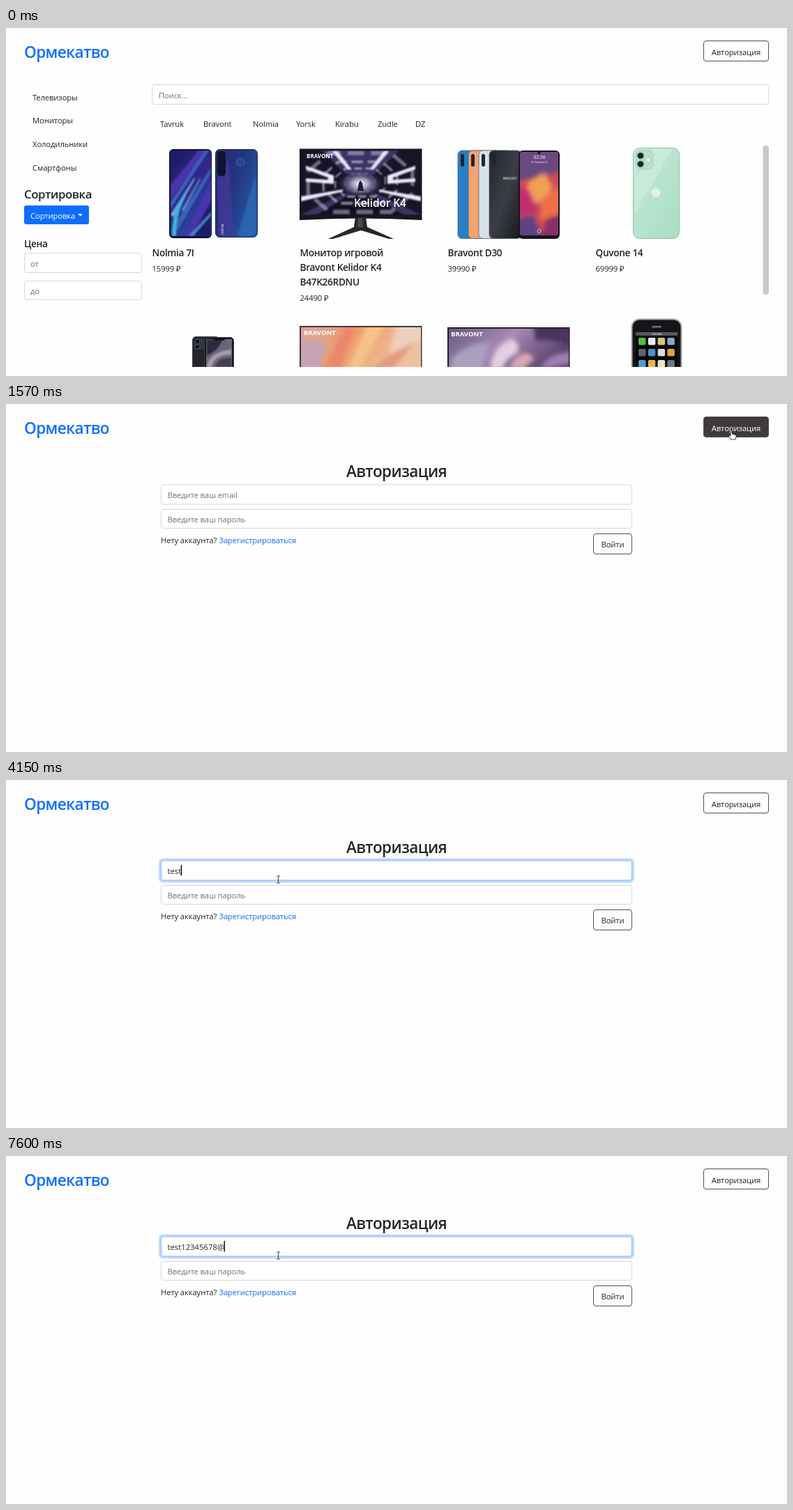
Recreate the animation shown at these times as an HTML page. Size 1120 px wide and 500 px high, loop 8000 ms.

```html
<!DOCTYPE html>
<html lang="ru">
<head>
<meta charset="utf-8">
<title>Магазин</title>
<style>
html, body { margin: 0; width: 100%; height: 100%; overflow: hidden; background: #fefefe; }
svg { display: block; }
text { font: 11.3px "Open Sans", "Noto Sans", sans-serif; letter-spacing: -.14px; fill: #212529; white-space: pre; }
#typed { letter-spacing: 0; }
.h2, .h4, .h5 { font-weight: 600; letter-spacing: -.025em; }
.h2 { font-size: 22.5px; }
.h4 { font-size: 16.8px; }
.h5 { font-size: 13.7px; }
.mark { font-weight: 700; font-size: 9.5px; letter-spacing: 0; }
.blue { fill: #0d6efd; }
.hint { fill: #6c757d; }
.white { fill: #fff; }
.mid { text-anchor: middle; }
.field { fill: #fff; stroke: #d3d8dd; }
.button { fill: #fefefe; stroke: #4d5154; }
.soft { filter: url(#soft); }
.softer { filter: url(#softer); }
</style>
</head>
<body>
<svg width="1120" height="500" viewBox="0 0 1120 500">
  <defs>
    <linearGradient id="night" x2=".6" y2="1"><stop stop-color="#1a1b57"/><stop offset=".5" stop-color="#31268a"/><stop offset="1" stop-color="#23509f"/></linearGradient>
    <linearGradient id="shell" x2="1" y2=".6"><stop stop-color="#2c2674"/><stop offset=".5" stop-color="#23357f"/><stop offset="1" stop-color="#2557a4"/></linearGradient>
    <linearGradient id="mint" x2="1" y2="1"><stop stop-color="#c3ebd7"/><stop offset="1" stop-color="#aadcc4"/></linearGradient>
    <linearGradient id="black" x2="1" y2="1"><stop stop-color="#23252c"/><stop offset=".5" stop-color="#3c3e46"/><stop offset="1" stop-color="#17181d"/></linearGradient>
    <linearGradient id="sunset" x2="1" y2=".3"><stop stop-color="#dba7a6"/><stop offset=".45" stop-color="#ee9c68"/><stop offset="1" stop-color="#efc0a0"/></linearGradient>
    <linearGradient id="violet" x2="1" y2=".4"><stop stop-color="#665a7c"/><stop offset=".5" stop-color="#a78ab8"/><stop offset="1" stop-color="#5d456f"/></linearGradient>
    <radialGradient id="glow"><stop stop-color="#fff"/><stop offset=".35" stop-color="#c9c5e6" stop-opacity=".8"/><stop offset="1" stop-color="#4c4380" stop-opacity="0"/></radialGradient>
    <filter id="soft"><feGaussianBlur stdDeviation=".8"/></filter>
    <filter id="softer"><feGaussianBlur stdDeviation="3"/></filter>
    <clipPath id="list"><path d="M200 160H1080V487H200z"/></clipPath>
    <clipPath id="screenA"><rect x="236" y="176" width="58" height="123" rx="4"/></clipPath>
    <clipPath id="screenB"><path d="M423 176H595V269H423z"/></clipPath>
    <clipPath id="screenC"><rect x="737" y="178" width="55" height="120" rx="4"/></clipPath>
    <clipPath id="screenE"><path d="M423 430H595V487H423z"/></clipPath>
    <clipPath id="screenF"><path d="M635 432H807V487H635z"/></clipPath>
  </defs>

  <text class="h2 blue" x="26" y="43">Ормекатво</text>
  <rect id="auth" x="1000.5" y="18.5" width="93" height="29" rx="3.5" stroke="#4d5154"/>
  <text id="authText" class="mid" x="1047" y="39">Авторизация</text>

  <g id="shop">
    <text x="38" y="103.5">Телевизоры</text>
    <text x="38" y="137">Мониторы</text>
    <text x="38" y="171">Холодильники</text>
    <text x="38" y="204.5">Смартфоны</text>
    <text class="h4" x="26" y="245">Сортировка</text>
    <rect class="blue" x="26" y="255" width="93" height="27" rx="3"/>
    <text class="white" x="35" y="273.5">Сортировка</text>
    <path class="white" d="M103 267h7l-3.5 3.5z"/>
    <text class="h5" x="26" y="314.5">Цена</text>
    <rect class="field" x="26.5" y="323.5" width="168" height="28" rx="3"/>
    <text class="hint" x="35" y="342.5">от</text>
    <rect class="field" x="26.5" y="363.5" width="168" height="27" rx="3"/>
    <text class="hint" x="35" y="382">до</text>
    <rect class="field" x="209.5" y="81.5" width="884" height="28" rx="3"/>
    <text class="hint" x="219" y="101">Поиск...</text>
    <g id="brands"></g>
    <rect x="1085.5" y="169" width="8.5" height="214" rx="4" fill="#c9c9c9"/>

    <g id="phoneA">
      <rect x="234" y="174" width="61" height="128" rx="6" fill="#11143a"/>
      <g clip-path="url(#screenA)">
        <path fill="url(#night)" d="M236 176h58v123h-58z"/>
        <g class="soft">
          <path fill="#4a35ab" d="M236 226l40-50h12l-52 70zM256 299l38-80v40l-20 40z"/>
          <path fill="#3a62bd" d="M236 250l50-74h5l-55 84zM240 285l54-84v7l-48 83z"/>
          <path fill="#6fa9e0" d="M236 268l34-53 1 2-31 55zM252 262l26-46 1 1-25 46z"/>
          <path fill="#3fb5dc" d="M238 299q0-36 17-60l3 2q-15 28-14 58z"/>
          <path fill="#1f1f68" d="M266 299l28-50v50zM236 176h24l-24 30z"/>
          <path fill="#4487cb" d="M262 299l32-34v4l-26 30z"/>
        </g>
      </g>
      <rect x="300.5" y="174.5" width="60" height="126" rx="6" fill="url(#shell)" stroke="#1b2452"/>
      <path class="soft" fill="#4d3aa0" opacity=".6" d="M303 216l16-28 8 110h-22z"/>
      <path class="soft" fill="#2d78c4" opacity=".5" d="M332 299l26-90v82l-4 7z"/>
      <rect x="303" y="177" width="12" height="36" rx="5" fill="#10132f"/>
      <circle cx="336" cy="193" r="6" fill="#24479a" stroke="#3f66b4"/>
      <text class="white" style="font-size:5px" transform="translate(312 297) rotate(-90)">nolmia</text>
    </g>

    <g id="monitor">
      <path fill="#18171c" d="M421 173.5h175.5V276q-88-5-175.5 0z"/>
      <g clip-path="url(#screenB)">
        <path fill="#171427" d="M423 176h172v93H423z"/>
        <g class="soft">
          <path fill="#3b3566" d="M452 176h112l-36 34h-40zM423 268l62-30h46l64 30z"/>
          <path fill="#131120" d="M446 268l50-31h24l50 31z"/>
          <g id="tunnel" fill="none" stroke="#dcd9f2"></g>
          <path fill="#eceafa" d="M430 198l40 14v12l-40-3v-5l32 2v-3l-32-12zM587 198l-40 14v12l40-3v-5l-32 2v-3l32-12z"/>
          <path fill="#eceafa" d="M468 177h7l20 26h-5zM549 177h-7l-20 26h5zM423 242l60-10v3l-60 14zM595 242l-60-10v3l60 14z"/>
        </g>
        <ellipse cx="508" cy="224" rx="32" ry="20" fill="url(#glow)"/>
        <path fill="#211c36" d="M504 234l2-11 2-4 3 4 2 11z"/>
      </g>
      <text class="mark white" style="font-size:8px" x="431" y="187">BRAVONT</text>
      <text class="white" style="font-size:15.5px;font-weight:600" x="499" y="257">Kelidor K4</text>
      <path fill="#27262b" d="M501 272h15l2 14 38 17h-7l-39-12h-2l-39 12h-7l37-17z"/>
      <path fill="#4b4a50" d="M505 273h6l1 13h-8z"/>
    </g>

    <g id="phonesC">
      <rect x="735" y="176" width="59" height="127" rx="6" fill="#15171c"/>
      <g clip-path="url(#screenC)">
        <path fill="#cf4a58" d="M737 178h55v120h-55z"/>
        <g class="softer">
          <path fill="#6a4a80" d="M730 170h70v34l-32 10-38 6z"/>
          <path fill="#f0a055" d="M748 222l24-14 12 20-12 22-24 2z"/>
          <path fill="#c22f70" d="M730 226l20 6 14 32-34 8z"/>
          <path fill="#ee6f49" d="M768 246l28-20v40l-30 10z"/>
          <path fill="#5c4382" d="M730 276l26-8 14 36h-40z"/>
          <path fill="#8b2f63" d="M766 304l10-30 24-8v38z"/>
        </g>
      </g>
      <circle cx="764.5" cy="179" r="2" fill="#111"/>
      <text class="white mid" style="font-size:7px" x="765" y="188">02:36</text>
      <text class="white mid" style="font-size:3.5px" x="765" y="194">Fri, February 22</text>
      <circle cx="764.5" cy="292" r="2.5" fill="none" stroke="#fff" stroke-width=".6"/>
    </g>
    <text class="white" style="font-size:4.5px" x="713" y="218">BRAVONT</text>

    <g id="phoneD">
      <rect x="899.5" y="172.5" width="66" height="130" rx="9" fill="url(#mint)" stroke="#8fbfa6"/>
      <path fill="#d8f3e5" opacity=".4" d="M929 173h28l-55 92v-45z"/>
      <rect x="903" y="176" width="25" height="27" rx="7" fill="#b7dfca" stroke="#a5d2bb"/>
      <g fill="#1c2326" stroke="#6f8f80"><circle cx="910" cy="183.5" r="4.5"/><circle cx="910" cy="195.5" r="4.5"/></g>
      <circle cx="921" cy="189.5" r="2" fill="#fffbe9"/>
      <circle cx="932" cy="236.5" r="6.5" fill="#e9eeec"/>
    </g>

    <g id="titles"></g>

    <g clip-path="url(#list)">
      <rect x="267.5" y="443.5" width="38" height="70" rx="5" fill="#23252b" stroke="#464950"/>
      <rect x="270" y="446" width="15" height="16" rx="4" fill="#34373e"/>
      <g fill="#090a0d" stroke="#686c74" stroke-width=".7"><circle cx="274.5" cy="450.5" r="3"/><circle cx="274.5" cy="458" r="3"/></g>
      <rect x="284.5" y="444.5" width="42" height="70" rx="5" fill="#14161c" stroke="#3d4047"/>
      <path fill="#6d6479" d="M287 447h37v41h-37z"/>
      <g class="soft">
        <path fill="#2b2b37" d="M288 448h22q-4 14-22 23z"/>
        <path fill="#a59cb0" d="M288 487q3-22 35-25v7q-25 1-28 18z"/>
        <path fill="#423c50" d="M300 487q3-13 23-13v13z"/>
      </g>
      <rect x="297" y="445" width="17" height="4" rx="2" fill="#14161c"/>

      <path fill="#40383c" d="M421 428h175.5v70H421z"/>
      <g clip-path="url(#screenE)">
        <path fill="url(#sunset)" d="M423 430h172v60H423z"/>
        <g class="softer">
          <path fill="#c3a3b4" d="M415 448l46 4-14 45h-32z"/>
          <path fill="#e9866f" d="M455 495l32-70h16l-26 70z"/>
          <path fill="#f5c287" d="M488 495l30-70h26l-40 70z"/>
          <path fill="#e39a80" d="M520 495l56-50 10 6-36 44z"/>
          <path fill="#ecd0bd" d="M560 425h40v20l-50 24z"/>
        </g>
      </g>
      <text class="mark white" x="427" y="441">BRAVONT</text>

      <path fill="#252129" d="M633 430h175.5v70H633z"/>
      <g clip-path="url(#screenF)">
        <path fill="url(#violet)" d="M635 432h172v60H635z"/>
        <g class="softer">
          <path fill="#a9a0bd" d="M640 474q24-22 54-22l-14 40h-42z"/>
          <path fill="#e2cfe0" d="M694 490q4-34 32-44 14 10 6 22-16 6-20 22z"/>
          <path fill="#dca6b4" d="M722 490q5-19 24-24l12 8-16 16z"/>
          <path fill="#49365f" d="M756 425h56v34q-27-14-52-9z"/>
          <path fill="#9d7fb2" d="M766 490q10-24 44-24v16z"/>
        </g>
      </g>
      <text class="mark white" x="638" y="443">BRAVONT</text>

      <rect x="897.5" y="418.5" width="71" height="100" rx="11" fill="#151517" stroke="#a5a5a8" stroke-width="2"/>
      <rect x="926" y="428" width="14" height="2.5" rx="1.2" fill="#707074"/>
      <path fill="#050506" d="M903 437h60v51h-60z"/>
      <path fill="#55585c" d="M903 437h60v5h-60z"/>
      <text class="white mid" style="font-size:4px" x="933" y="441.2">9:42 AM</text>
      <g id="icons"></g>
    </g>
  </g>

  <g id="login">
    <text class="h2 mid" x="560" y="105">Авторизация</text>
    <rect id="ring" x="219" y="112.5" width="682" height="35" rx="6" fill="#bfdaff"/>
    <rect id="email" class="field" x="222.5" y="116" width="675" height="28" rx="3"/>
    <text id="hint" class="hint" x="231.5" y="134.5">Введите ваш email</text>
    <text id="typed" x="231.5" y="134.5"></text>
    <rect id="caret" y="122" width="1.4" height="15.5"/>
    <rect class="field" x="222.5" y="151.5" width="675" height="27" rx="3"/>
    <text class="hint" x="231.5" y="169.5">Введите ваш пароль</text>
    <text x="222" y="199.5">Нету аккаунта?</text>
    <text class="blue" x="305.5" y="199.5">Зарегистрироваться</text>
    <rect class="button" x="842.5" y="186.5" width="55" height="29" rx="3.5"/>
    <text class="mid" x="870" y="206">Войти</text>
  </g>

  <circle id="click" r="8.5" fill="#d2cb00" opacity=".75"/>
  <g id="cursor" stroke-linejoin="round">
    <path id="arrow" d="M0 0v12l2.8-2.6 1.9 4.2 1.9-.8-1.900-4.100H8.400z" fill="#fff" stroke="#111" stroke-width=".8"/>
    <path id="hand" d="M-1 0q1-1 2 0v5l5 1.300q1.500.6 1.200 2.200L6 13H0L-3.500 8.500q-.5-1.700 1-1.500L-1 8z" fill="#fff" stroke="#111" stroke-width=".8"/>
    <path id="beam" d="M-2.500-5h2l.5.500.5-.500h2M0-4.500v9M-2.500 5h2l.5-.500.5.500h2" fill="none" stroke="#222" stroke-width=".9"/>
  </g>
</svg>
<script>
const $ = id => document.getElementById(id);
const add = (id, markup) => $(id).insertAdjacentHTML('beforeend', markup);
const label = (x, y, text, cls = '') => `<text class="${cls}" x="${x}" y="${y}">${text}</text>`;

const brands = { Tavruk: 221, Bravont: 283, Nolmia: 354, Yorsk: 416, Kirabu: 472, Zudle: 533, DZ: 587 };
for (const name in brands) add('brands', label(brands[name], 142, name));

const goods = [
  ['15999', 'Nolmia 7I'],
  ['24490', 'Монитор игровой', 'Bravont Kelidor K4', 'B47K26RDNU'],
  ['39990', 'Bravont D30'],
  ['69999', 'Quvone 14'],
];
goods.forEach(([price, ...lines], i) => {
  const x = 209.5 + 212 * i;
  lines.forEach((line, j) => add('titles', label(x, 328 + 20.8 * j, line, 'h5')));
  add('titles', label(x, 329.5 + 20.8 * lines.length, price + ' ₽'));
});

[.25, .42, .62, .88].forEach((s, i) => add('tunnel',
  `<path transform="translate(508 222) scale(${s})" stroke-width="${3 + i}" stroke-dasharray="26 12" opacity="${.9 - i * .15}"
    d="M-85-18L-50-48H50L85-18V18L50 48H-50L-85 18z"/>`));

['#277fc6', '#f2a273', '#d5e0e8', 'url(#black)'].forEach((color, i) => {
  const x = 648 + 15 * i;
  $('phonesC').insertAdjacentHTML('beforebegin',
    `<rect x="${x}" y="176" width="46" height="126.5" rx="6" fill="${color}" stroke="#555b66" stroke-width=".7"/>
     <rect x="${x + 4}" y="181" width="5" height="18" rx="2.5" fill="#20242c"/>`);
});

const iconColors = ['#58b947', '#e8ecef', '#d9c178', '#87a9c8', '#5b6470', '#4a91cc', '#d7dde0', '#dfa33f',
  '#4e9ad6', '#e7b84c', '#eee5c4', '#6f7780'];
iconColors.forEach((color, i) => add('icons',
  `<rect x="${907 + i % 4 * 13.8}" y="${445 + (i >> 2) * 16}" width="10.5" height="10.5" rx="2" fill="${color}"/>`));

const easeOut = p => p * (2 - p);
const smooth = p => p * p * (3 - 2 * p);
const ramp = (t, from, to) => Math.min(1, Math.max(0, (t - from) / (to - from)));
const mix = (a, b, p) => a + (b - a) * p;
const blend = (a, b, p) => `rgb(${a.map((v, i) => mix(v, b[i], p))})`;
const between = (t, a, b) => t >= a && t < b;
const show = (id, on) => $(id).style.display = on ? '' : 'none';

// start, end, steps, easing, from, to
const moves = [
  [190, 970, 11, easeOut, [1062, 385], [1040, 38]],
  [1570, 2330, 11, smooth, [1040, 38], [388, 155]],
  [2330, 2610, 4, smooth, [388, 155], [390.5, 143]],
];
const word = 'test12345678@';
const keys = [3750, 3880, 4010, 4150, 4820, 5080, 5280, 5610, 5870, 6200, 6600, 6870, 7600];
const caretOff = [[3550, 3750], [4750, 4820], [7350, 7600]];

function pointer(t) {
  const [start, end, steps, ease, from, to] = moves.findLast(m => t >= m[0]) || moves[0];
  const p = ease(Math.floor(ramp(t, start, end) * steps + .001) / steps);
  return from.map((v, i) => mix(v, to[i], p));
}

function pointerKind(x, y, inShop) {
  if (x >= 1000 && x <= 1094 && y >= 19 && y <= 48) return 'hand';
  const overField = inShop ? between(y, 82, 110)
    : between(x, 222, 898) && (between(y, 116, 144.5) || between(y, 151, 179));
  return overField ? 'beam' : 'arrow';
}

function draw(t) {
  const inShop = t < 1570;
  show('shop', inShop);
  show('login', !inShop);

  const hover = ramp(t, 820, 970) - ramp(t, 1700, 1850);
  $('auth').style.fill = blend([254, 254, 254], [64, 58, 60], hover);
  $('authText').style.fill = blend([33, 37, 41], [255, 255, 255], hover);

  const [x, y] = pointer(t);
  const kind = pointerKind(x, y, inShop);
  show('cursor', t >= 190);
  $('cursor').setAttribute('transform', `translate(${x} ${y})`);
  for (const id of ['arrow', 'hand', 'beam']) show(id, id === kind);

  show('click', between(t, 1370, 1570) || between(t, 3010, 3210));
  $('click').setAttribute('cx', x);
  $('click').setAttribute('cy', y);

  const focus = ramp(t, 2970, 3220);
  $('ring').style.opacity = focus;
  $('email').style.stroke = blend([211, 216, 221], [134, 183, 254], focus);
  const count = keys.filter(k => t >= k).length;
  show('hint', !count);
  $('typed').textContent = word.slice(0, count);
  show('caret', t >= 3010 && !caretOff.some(([a, b]) => between(t, a, b)));
  if (!inShop) $('caret').setAttribute('x', 231 + (count && $('typed').getComputedTextLength()));
}

const begin = performance.now();
function frame() {
  draw((performance.now() - begin) % 8000);
  requestAnimationFrame(frame);
}
frame();
</script>
</body>
</html>
```
